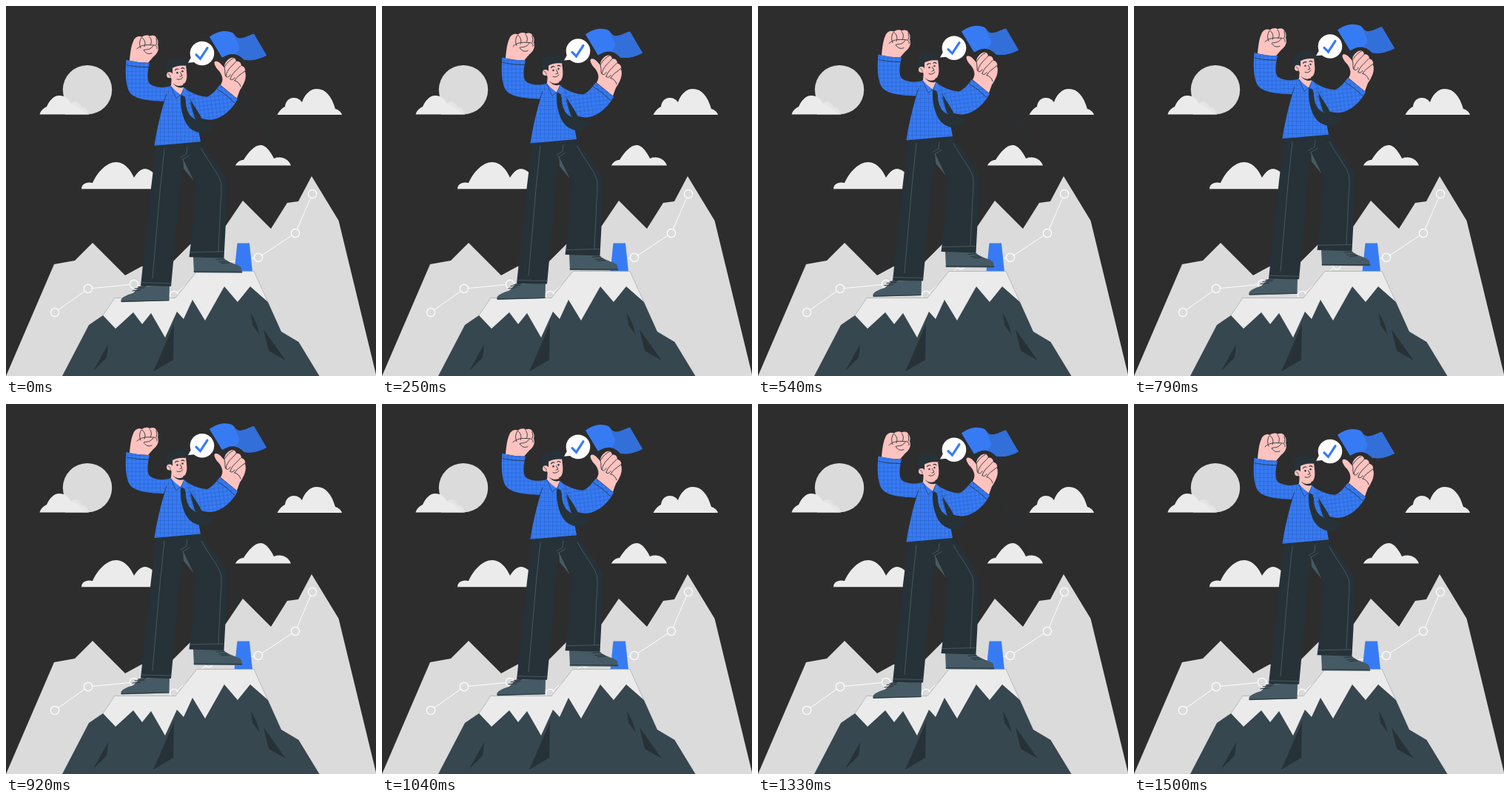
These frames come from a looping animation (500x500 px, 1540 ms). An HTML page with a canvas:

```html
<!DOCTYPE html>
<html lang="en">
<head>
<meta charset="utf-8">
<title>Summit</title>
<style>
html, body { margin: 0; width: 100%; height: 100%; overflow: hidden; background: #2d2d2d; }
canvas { display: block; width: 500px; height: 500px; }
</style>
</head>
<body>
<canvas id="stage"></canvas>
<script>
const canvas = document.getElementById('stage');
const ctx = canvas.getContext('2d');
const ratio = window.devicePixelRatio || 1;
canvas.width = canvas.height = 500 * ratio;

const LOOP = 1540, STEP = 1000 / 24, LAST = 36;
const BASE = 0.8, RISE = 10;
const BLUE = '#377bf4', BLUE_DARK = '#336fd9', GRID = '#2b62c4';
const SKIN = '#ffc3bf', INK = '#263238', SLATE = '#455a64';
const SNOW = '#ebebeb', HAZE = '#dbdbdb';

function fill(d, color) {
  ctx.fillStyle = color;
  ctx.fill(new Path2D(d));
}
function line(d, color, width = 1) {
  ctx.strokeStyle = color;
  ctx.lineWidth = width;
  ctx.stroke(new Path2D(d));
}
function disc(x, y, r, color) {
  ctx.fillStyle = color;
  ctx.beginPath();
  ctx.arc(x, y, r, 0, 2 * Math.PI);
  ctx.fill();
}

function sky() {
  ctx.fillStyle = '#2d2d2d';
  ctx.fillRect(0, 0, 500, 500);
  disc(110, 113.2, 33.2, HAZE);
  fill('M80 146.5C82 136 86 130 93 129C99 129 101 134 102 137C107 136 111 141 112 146.5Z', '#e5e5e5');
  fill('M45.5 146.5C47 141 51 138 55 136C59 127 65 121 72 121C79 121 84 125 87 131C92 132 99 138 109 146.5Z', SNOW);
  fill('M102 247.3C102 241 108 237 117 239C124 224 136 211 149 211C160 211 168 221 173 232C177 225 182 220 188 220C199 221 208 235 215 247.3Z', SNOW);
  fill('M366.5 147C370 141 373 138 377 136C378 128 383 124 389 124C394 124 398 127 400 130C404 119 411 112 420 112C432 112 440 122 445 139C449 140 453 143 454 147Z', SNOW);
  fill('M310 215.5C313 210 317 208 321 208C328 197 336 188 344 188C351 188 357 196 362 206C372 202 382 207 385 215.5Z', SNOW);
}

function mountains() {
  fill('M0 500L65 349L93 344L117 320L161 364L183 352L225 346L249 322L270 318L297 297L320 263L358 301L380 266L395 264L413 230L449.5 290L500.5 500Z', HAZE);

  const nodes = [[66, 414], [111, 382], [173, 376], [227, 391], [274, 350], [341, 340], [391, 307], [414, 254]];
  line('M' + nodes.join('L'), '#fff');
  for (const [x, y] of nodes) {
    disc(x, y, 6.2, '#fff');
    disc(x, y, 5, HAZE);
  }

  fill('M312.5 320.5H329L333 359H308.5Z', BLUE);
  fill('M76 500L112 431L131 418L147 394.5H229L258 358.5H335L354 400L372 440L395.5 454L423.5 500Z', '#37474f');
  fill('M131 418L147 394.5H229L258 358.5H335L354 400L330 379L313 400L295 379L269 425L252 397L240 423L231 413L215 448L196 415L184 430L172 414L148 436Z', SNOW);
  line('M131 418L147 394.5H229L258 358.5H335L354 400', '#b4b8ba', .6);
  fill('M138 457L136 475L118 493Z', INK);
  fill('M227 430L226 478L199 494Z', INK);
  fill('M331 415L338 428L343 444L333 431Z', INK);
  fill('M348 437L378 479L355 466Z', INK);
}

function flag() {
  line('M274 39L370 197', INK, 1.2);
  fill('M275 41C285 33 299 31 307 36C310 40 312 43 316 43C322 43 328 39 335 37L352 66C338 73 329 73 322 72C312 61 302 63 292 69Z', BLUE);
  fill('M307 36C310 40 312 43 316 43C322 43 328 39 335 37L352 66C338 73 329 73 322 72C319 67 315 65 310 63C321 57 311 47 307 36Z', BLUE_DARK);
}

function bubble() {
  disc(265, 63.2, 16.3, '#fff');
  fill('M251 67L246 76L257 75Z', '#fff');
  line('M257 65L262.5 70.5L272 56', BLUE, 3.2);
}

function legs() {
  fill('M181 378L221 377L220.5 397.5L156 399.5C154 395 157 392 172 387Z', SLATE);
  line('M156 398.5L220 397', INK, .9);
  line('M171 384L182 383M174 381L187 380M178 379L189 377.5', INK);
  fill('M253 338L292 338C300 347 315 348 318 353L319 360L254 359.5Z', SLATE);
  line('M254 358L319 358.5', INK, .9);
  line('M284 342L295 341M288 345L299 344M291 347L302 346', INK);

  fill('M203 188L263 183C273 198 292 218 298 235Q300 240 299 254L294.5 340L247.5 338.5Q255 285 256 237L240 204Q238 220 236 237L223 378L182 377.5L196 245Z', INK);
  fill('M239 205L240 219L254 236Z', SLATE);
  line('M214 192L208 250L198 367M184 373L223 374', '#536871', .7);
  line('M264 192C273 209 286 224 290 236Q292 242 290 266L287 331M249 332L294 331', '#536871', .7);
  line('M245 190L244 199L236 204M238 207L248 201', '#536871', .7);
}

const SLEEVE_LEFT = 'M162.5 72Q178 76 194 76C191 88 190 99 194 104C200 109 211 111 224 107L214 128C196 128 177 125 170 119C161 111 161 89 162.5 72Z';
const TORSO = 'M222 107L240 110C247 115 255 122 256 133L260 167L263 182.5L200.5 188C204 165 209 145 214 128Z';
const SLEEVE_RIGHT = 'M240 110C252 118 263 122 272 122C279 119 284 112 289 106L313 125C306 139 290 153 276 153C266 153 257 149 252 145Z';

function plaid(shape, slope) {
  ctx.save();
  ctx.clip(new Path2D(shape));
  ctx.globalAlpha = .7;
  for (let p = 60; p < 325; p += 5.5) {
    line(`M${p} 60L${p + slope * 130} 190`, GRID, .8);
    line(`M150 ${p}L325 ${p - slope * 175}`, GRID, .8);
  }
  ctx.restore();
}

function shirt() {
  for (const part of [SLEEVE_LEFT, TORSO, SLEEVE_RIGHT]) fill(part, BLUE);
  plaid(SLEEVE_LEFT, 0);
  plaid(TORSO, 0);
  plaid(SLEEVE_RIGHT, .12);
  line('M163 79Q178 82 193 82M285 111Q298 119 309 130', INK, .8);
  line('M213 129L217 118M254 145L249 130', INK, .7);

  fill('M249 125C253 134 261 142 265 153L262 156L255 151Z', INK);
  fill('M236 120L241 121L243 127C243 142 250 153 261 153L282 160L272 170C258 173 248 166 243 157C238 147 236 136 236 126Z', INK);
  fill('M222 107L226 105L236 119L230 124Z', BLUE);
  fill('M241 109L237 119L243 123L244 113Z', BLUE);
  line('M223 108L230 124L236 119L225 106M240 110L237 119L243 123', INK, .6);
}

function hands() {
  fill('M167 73C168 63 169 53 172 47C174 41 179 39 184 41C187 38 192 38 194 40C198 38 202 39 203 42C206 45 206 49 205 52C208 59 203 65 199 68L192 76Q179 76 167 73Z', SKIN);
  line('M183 42C180 47 180 51 182 56M184 42C188 45 189 51 187 54M194 41C197 44 197 49 195 52M203 43Q205 48 203 52M177 57C184 50 194 52 199 52C203 52 205 55 204 57M199 53C194 60 189 57 186 59C189 63 192 65 197 63', INK, .9);

  fill('M290 106C295 99 292 91 286 85C282 80 280 75 283 74C288 73 291 79 295 82C295 76 300 70 306 69C310 69 311 73 311 74C316 73 318 77 318 80C322 81 324 84 323 88C326 96 321 106 316 113L312 124Z', SKIN);
  line('M295 82C298 77 302 72 307 70M297 94C299 84 306 80 311 74M303 98C305 90 312 86 317 80M309 100C312 94 317 92 323 87M295 82C297 87 295 92 297 94C300 97 302 94 303 92M303 98Q306 101 309 96M309 100C313 101 316 104 317 108', INK, .9);
}

function head() {
  fill('M224 94L239 103L240 110L236 119C230 115 225 110 223 107Z', SKIN);
  fill('M225 103C230 108 236 109 242 104L240 109Q232 112 225 103Z', INK);
  fill('M221 82C229 78 237 77 243 79C244 88 246 97 242 103C237 107 229 105 225 101L222 94Z', SKIN);
  fill('M222 96C215 93 214 79 219 73C223 68 229 71 233 69C237 66 242 70 242 72C246 74 246 78 242 80C235 79 229 81 225 83L225 90Z', INK);
  disc(221, 92.5, 4, SKIN);
  line('M219 91Q222 91 222 95', INK, .7);
  disc(231.5, 89.5, 1.2, INK);
  disc(238.5, 87.5, 1.2, INK);
  line('M228.5 86Q230 83.5 233 84.5M237 83.5Q239 82 241 84', INK, 1.1);
  line('M235.5 89L238 93.5L235 94.5M231 98Q236 100 239 95.5', INK, .9);
}

function climber() {
  legs();
  hands();
  shirt();
  head();
}

function render(now) {
  const index = Math.min(LAST, Math.floor((now % LOOP + 4.9) / STEP));
  const phase = index / LAST;
  const lift = RISE * (1 - Math.abs(1 - 2 * phase));

  ctx.setTransform(ratio, 0, 0, ratio, 0, 0);
  ctx.lineCap = 'round';
  sky();
  mountains();
  ctx.translate(0, BASE - lift);
  flag();
  climber();
  bubble();
}

const start = performance.now();
function tick() {
  render(performance.now() - start);
  requestAnimationFrame(tick);
}
tick();
</script>
</body>
</html>
```
